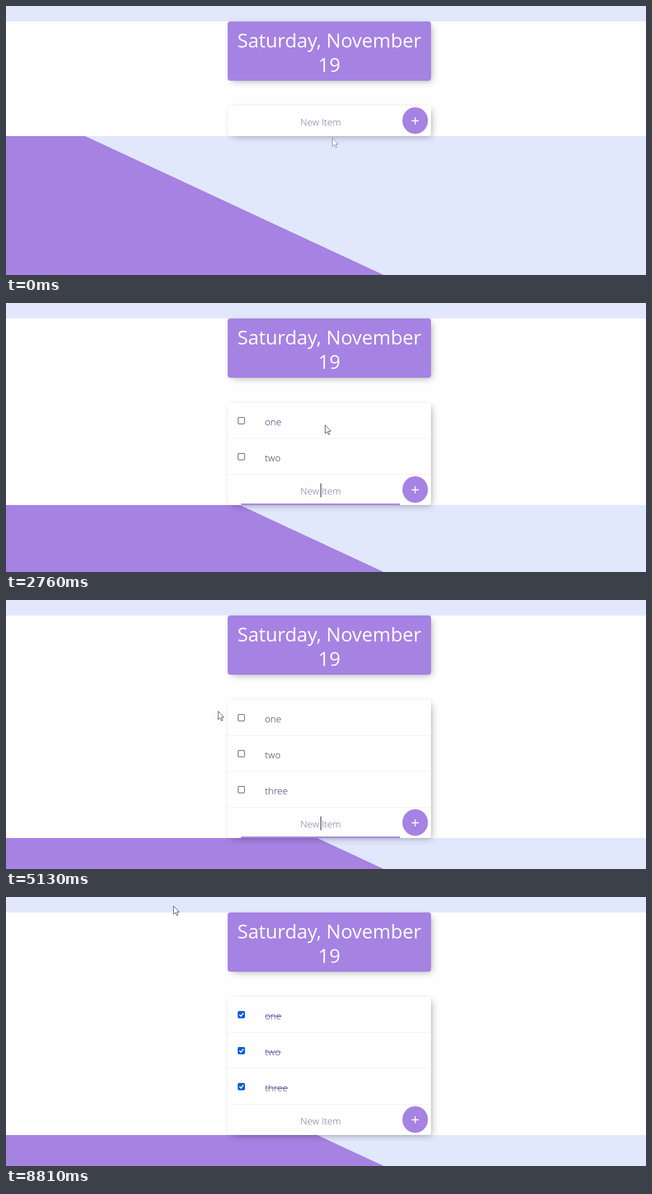
An HTML page for the animation above (8880 ms loop, 1152 by 486 pixels).

```html
<!DOCTYPE html>
<html lang="en">
<head>
<meta charset="utf-8">
<title>To-do list</title>
<style>
  html, body { margin: 0; width: 100%; height: 100%; overflow: hidden; background: #e2e8fc; }
  #stage { position: relative; width: 1152px; height: 486px; overflow: hidden; background: #e2e8fc; }
  #stage > * { position: absolute; }
  svg { left: 0; top: 0; font-family: "Open Sans", "Noto Sans", sans-serif; }
  #page { left: 0; top: 28px; width: 1152px; background: #fefefe; }
  .box { left: 399px; width: 366px; border-radius: 4.5px; box-shadow: 4.5px 4.5px 14px -4px rgba(0,0,0,.32), 0 0 5px rgba(0,0,0,.05); }
  #head { top: 28px; height: 106.5px; background: #a682e3; }
  #card { top: 180px; background: #fefefe; }
  .title { font-size: 34.8px; fill: #fff; text-anchor: middle; }
  .item, .field { font-size: 17.2px; font-weight: 300; fill: #392d62; }
  .field { text-anchor: middle; }
  .empty { fill: #7d6e90; }
  .square { fill: #fff; stroke: #78727f; stroke-width: 1.5; }
  .hover .square { stroke: #48454f; }
  .done .item { fill: #4a3783; }
  .done .square { fill: #0560da; stroke: #0560da; }
  .tick { fill: none; stroke: #fff; stroke-width: 1.9; }
  .strike { fill: #5c4a94; }
  .tick, .strike { visibility: hidden; }
  .done .tick, .done .strike { visibility: visible; }
</style>
</head>
<body>
<div id="stage">
  <svg width="1152" height="486"><path d="M0 168.5 L680 486 H0Z" fill="#a682e3"/></svg>
  <div id="page"></div>
  <div id="head" class="box"></div>
  <div id="card" class="box"></div>
  <svg width="1152" height="486">
    <text class="title" x="582" y="75">Saturday, November</text>
    <text class="title" x="582" y="119">19</text>
    <g id="rows"></g>
    <g id="entry">
      <text id="field" class="field" x="566.3" y="216"></text>
      <rect id="line" x="423" y="232.3" width="286" height="2.7" fill="#a682e3"/>
      <rect id="caret" y="196" width="1.5" height="25" fill="#44404c"/>
      <ellipse cx="736.5" cy="207" rx="23" ry="24" fill="#a682e3"/>
      <path d="M730 207.5h13M736.5 201v13" stroke="#fff" stroke-width="1.8"/>
    </g>
    <path id="cursor" d="M.5 .5V15.7L4 12.5L6.4 17.8L8.7 16.8L6.4 11.6H10.9Z" fill="#fff" stroke-width=".9"/>
  </svg>
</div>
<script>
const LOOP = 8880, STEP = 70, ROW = 65;
const FOCUS = 250, KEY = 140, BLINK = 500;
const $ = id => document.getElementById(id);

const items = [
  { text: 'one', type: 1140, add: 1750, done: 5400 },
  { text: 'two', type: 2220, add: 2760, done: 6620 },
  { text: 'three', type: 3090, add: 3890, done: 7370 }
];

// pointer: each move is a curve from the last stop, bent towards "via"
const home = [587, 238];
const moves = [
  { at: 70, steps: 4, via: [580, 229], to: [574, 220] },
  { at: 4430, steps: 12, via: [155, 158], to: [421, 208] },
  { at: 5530, steps: 10, via: [400, 165], to: [428, 275] },
  { at: 6690, steps: 7, via: [408, 285], to: [422, 342] },
  { at: 7560, steps: 6, via: [424, 390], to: [411, 396] },
  { at: 8110, steps: 11, via: [750, 215], to: [301, 15.5] }
];

function pointer(t) {
  return moves.filter(m => t >= m.at).reduce((from, m) => {
    const u = Math.min(1, (Math.floor((t - m.at) / STEP) + 1) / m.steps), v = 1 - u;
    return from.map((a, d) => v * v * a + 2 * u * v * m.via[d] + u * u * m.to[d]);
  }, home);
}

$('rows').innerHTML = items.map((it, i) => `<g transform="translate(0 ${i * ROW})">
  <rect class="square" x="417.8" y="206.8" width="11.6" height="11.6" rx="1.6"/>
  <path class="tick" d="M420.2 212.7l2.5 2.6 4.6-5.4"/>
  <text class="item" x="466" y="220.5">${it.text}</text>
  <rect class="strike" x="466.5" y="214.6" height="1"/>
  <rect x="399" y="244" width="366" height="1.3" fill="#f1f1f3"/></g>`).join('');
const rows = [...$('rows').children];
for (const row of rows) {
  const width = row.querySelector('.item').getComputedTextLength();
  row.querySelector('.strike').setAttribute('width', width);
}

const show = (el, on) => { el.style.display = on ? '' : 'none'; };

function drawPointer(t) {
  const [x, y] = pointer(t);
  $('cursor').setAttribute('transform', `translate(${x.toFixed(1)} ${y.toFixed(1)})`);
  $('cursor').setAttribute('stroke', t < FOCUS ? '#7a66b4' : '#262432');
  return [x, y];
}

function drawEntry(t, next) {
  const letters = next ? Math.max(0, Math.floor((t - next.type) / KEY) + 1) : 0;
  const typed = letters ? next.text.slice(0, letters) : '';
  const field = $('field');
  field.textContent = typed || 'New Item';
  field.classList.toggle('empty', !typed);

  // the caret blinks from the latest key press
  const presses = items.flatMap(it => [...it.text].map((c, i) => it.type + i * KEY).concat(it.add));
  const last = Math.max(FOCUS, ...presses.filter(p => t >= p));
  const focused = t >= FOCUS && t < items[0].done;
  show($('line'), focused);
  show($('caret'), focused && (t - last) % (2 * BLINK) < BLINK);
  $('caret').setAttribute('x', 566 + (typed ? field.getComputedTextLength() / 2 : 0));
}

function draw(t) {
  const [x, y] = drawPointer(t);
  const count = items.filter(it => t >= it.add).length;
  const bottom = 235 + count * ROW;
  $('page').style.height = bottom - 28 + 'px';
  $('card').style.height = bottom - 180 + 'px';
  $('entry').setAttribute('transform', `translate(0 ${count * ROW})`);

  rows.forEach((row, i) => {
    const over = Math.abs(x - 423.5) < 7 && Math.abs(y - 212.5 - i * ROW) < 7;
    show(row, i < count);
    row.classList.toggle('done', t >= items[i].done);
    row.classList.toggle('hover', over);
  });
  drawEntry(t, items[count]);
}

const begin = performance.now();
function frame() {
  draw((performance.now() - begin) % LOOP);
  requestAnimationFrame(frame);
}
frame();
</script>
</body>
</html>
```
